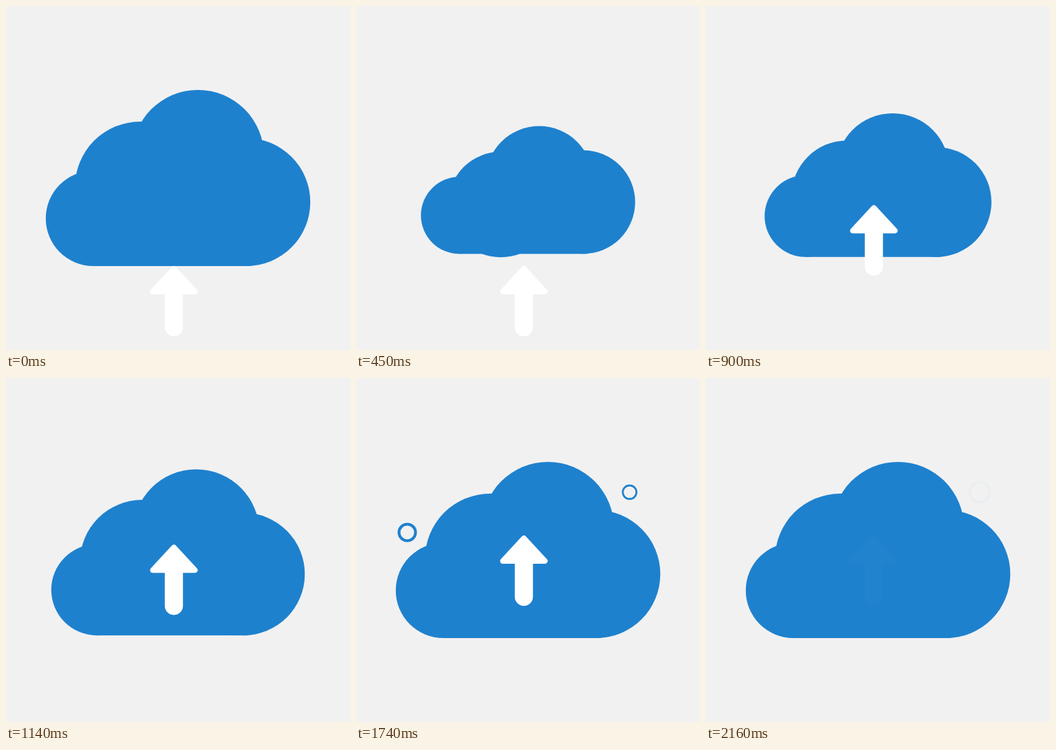
These frames come from a looping animation (500 px wide and 500 px high, 2.73 s). An HTML page:

```html
<!DOCTYPE html>
<html lang="en">
<head>
<meta charset="utf-8">
<title>Cloud upload</title>
<style>
  html, body { margin: 0; width: 100%; height: 100%; overflow: hidden; background: #f1f1f1; }
  svg { display: block; width: 100%; height: 100%; }
</style>
</head>
<body>
<svg viewBox="0 0 500 500">
  <g id="cloud" fill="#1e81ce">
    <rect x="127" y="250" width="229" height="128"/>
    <circle cx="127" cy="308.8" r="69.2"/>
    <circle cx="349.3" cy="285" r="93"/>
    <circle id="top" cx="279" cy="218" r="96"/>
    <g id="mid">
      <circle cx="195" cy="262.8" r="94.7"/>
      <path id="shine" d="M117.7 242.3A80 80 0 0 1 196.4 183" pathLength="1"
            fill="none" stroke="#fff" stroke-width="4" stroke-linecap="round"/>
    </g>
  </g>
  <g fill="none" stroke="#1e81ce">
    <circle id="ringLeft" r="15" stroke-width="5"/>
    <circle id="ringRight" r="15" stroke-width="4"/>
  </g>
  <g id="arrow" fill="#fff" stroke="#fff" stroke-linejoin="round" stroke-linecap="round">
    <path d="M244 382L274.5 415H213.5Z" stroke-width="8"/>
    <path d="M244 412V467" stroke-width="26.4"/>
  </g>
</svg>
<script>
const LOOP = 2730, STEP = 30, LAST = 2160;
const el = id => document.getElementById(id);
const [cloud, topPuff, midPuff, shine, arrow, ringLeft, ringRight] =
  ['cloud', 'top', 'mid', 'shine', 'arrow', 'ringLeft', 'ringRight'].map(el);

const span = (t, from, to) => Math.min(1, Math.max(0, (t - from) / (to - from)));
const smooth = u => u * u * (3 - 2 * u);

// cubic-bezier(1/3, 0, 0, 1), solved by bisection
function settle(u) {
  if (u <= 0 || u >= 1) return u;
  let lo = 0, hi = 1;
  for (let i = 0; i < 30; i++) {
    const k = (lo + hi) / 2;
    if (k * (1 - k) ** 2 + k ** 3 < u) lo = k; else hi = k;
  }
  return smooth(lo);
}

// Rises to 1 at the turn, then settles back to 0
const dip = (t, turn, end) =>
  t < turn ? smooth(t / turn) : 1 - settle(span(t, turn, end));

const move = (node, x, y) => node.setAttribute('transform', `translate(${x} ${y})`);

function drawRing(node, t, x, y, start, size) {
  const grow = settle(span(t, start, start + 625)) * size;
  node.setAttribute('transform', `translate(${x} ${y}) scale(${grow})`);
  node.setAttribute('opacity', grow ? 1 - span(t, start + 325, start + 632) : 0);
}

function draw(t) {
  const scale = 1 - 0.25 * dip(t, 660, 1710);
  cloud.setAttribute('transform',
    `translate(250 285) scale(${scale}) translate(-250 -285)`);

  const sink = dip(t, 570, 1740);
  move(topPuff, -10 * sink, 30 * sink);
  move(midPuff, 7 * sink, 30 * sink);

  const tip = smooth(span(t, 1170, 1380));
  const tail = smooth(span(t, 1260, 1470));
  shine.setAttribute('visibility', tip > tail ? 'visible' : 'hidden');
  shine.setAttribute('stroke-dasharray', `${tip - tail} 2`);
  shine.setAttribute('stroke-dashoffset', -tail);

  move(arrow, 0, -149 * settle(span(t, 660, 1500)));
  arrow.setAttribute('opacity', 1 - span(t, 1860, 2164));

  drawRing(ringLeft, t, 74.5, 224.5, 1475, 1);
  drawRing(ringRight, t, 397.7, 166, 1535, 0.98);
}

const begin = performance.now();
function tick() {
  const t = Math.max(0, performance.now() - begin) % LOOP;
  draw(Math.min(LAST, Math.floor(t / STEP) * STEP));
  requestAnimationFrame(tick);
}
tick();
</script>
</body>
</html>
```
